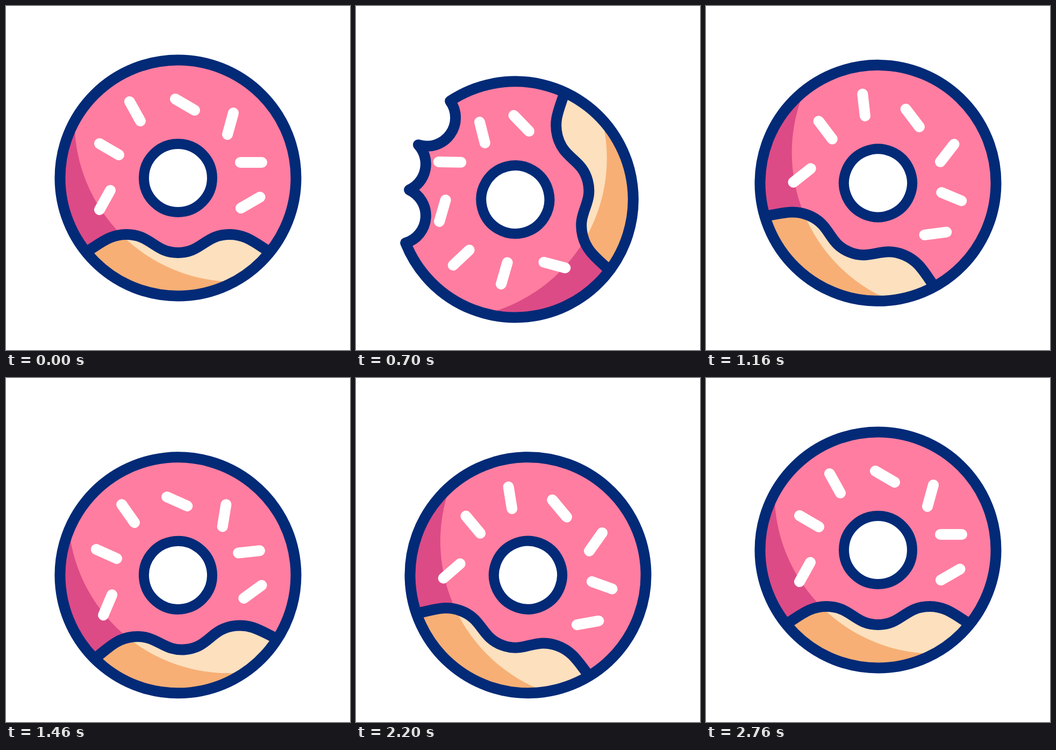
Write an HTML page that moves like this. It is 640 px wide and 640 px high and loops after 3000 ms.

```html
<!DOCTYPE html>
<html lang="en">
<head>
<meta charset="utf-8">
<title>Donut</title>
<style>
  html, body { margin: 0; width: 100%; height: 100%; overflow: hidden; background: #fff; }
  svg { display: block; width: 100%; height: 100%; }
  .line { fill: none; stroke: #022a77; stroke-width: 20; stroke-linejoin: round; }
  .round { fill: none; stroke-width: 20; stroke-linecap: round; }
</style>
</head>
<body>
<svg viewBox="0 0 640 640">
  <defs>
    <path id="body"/>
    <clipPath id="inside"><use href="#body"/></clipPath>
    <clipPath id="lit"><circle cx="105.5" cy="-105" r="298"/></clipPath>
    <path id="icing" d="M-165 134C-140 118-124 105-96 105C-50 105-44 139 0 139C44 139 50 105 96 105C124 105 140 118 165 134L240 180V-240H-240V180Z"/>
  </defs>
  <path id="rays" class="round" stroke="#ffcb4f"/>
  <g id="donut">
    <g clip-path="url(#inside)">
      <path fill="#f7af75" d="M-240-240H240V240H-240Z"/>
      <path fill="#fde0be" d="M-240-240H240V240H-240Z" clip-path="url(#lit)"/>
      <use href="#icing" fill="#dc4b86"/>
      <g clip-path="url(#lit)"><use href="#icing" fill="#ff7da0"/></g>
      <use href="#icing" class="line"/>
    </g>
    <path class="round" stroke="#fff" d="M-90-142L-70-106M-5-147L31-126M103-121L92-81M116-29H156M117 56L152.5 35.5M-146-64L-110-43M-126 23L-146 59"/>
    <circle r="63.5" class="line" style="fill:#fff;stroke-width:19"/>
    <use href="#body" class="line"/>
  </g>
</svg>
<script>
const LOOP = 3000, BITE = 360, HEAL = 1020;
const WHOLE = 'M219.5 0A219.5 219.5 0 1 1-219.5 0A219.5 219.5 0 1 1 219.5 0Z';
const BITTEN = 'M207.4-72.6A219.5 219.5 0 1 1-28.3-217.7A53 53 0 0 0 65.8-186.8A53 53 0 0 0 143-150A53 53 0 0 0 207.4-72.6Z';

// Keys are [time, value] pairs, eased between neighbours.
const xKeys = [[200, 320], [BITE, 325], [546, 277], [878, 320]];
const yKeys = [[200, 320], [BITE, 311], [546, 393], [878, 320], [1000, 320],
               [1620, 376], [1940, 330], [2300, 375], [2760, 320]];
const turnKeys = [[BITE, 0], [1330, -367], [1940, -360], [2300, -335.6], [2760, -360]];
const rayHead = [[BITE, 0], [510, 1]];
const rayTail = [[450, 0], [620, 1]];
// Inner end and outer end of each ray.
const rays = [[345.5, 96, 314, 23], [396, 102, 425.5, 27], [440, 133, 513.5, 102]];

const $ = id => document.getElementById(id);

function at(keys, t) {
  if (t <= keys[0][0]) return keys[0][1];
  for (let i = 1; i < keys.length; i++) {
    const [t0, a] = keys[i - 1], [t1, b] = keys[i];
    if (t < t1) {
      const p = (t - t0) / (t1 - t0);
      return a + (b - a) * p * p * (3 - 2 * p);
    }
  }
  return keys[keys.length - 1][1];
}

function draw(t) {
  $('donut').setAttribute('transform',
    `translate(${at(xKeys, t)} ${at(yKeys, t)}) rotate(${at(turnKeys, t)})`);
  $('body').setAttribute('d', t >= BITE && t < HEAL ? BITTEN : WHOLE);

  const head = at(rayHead, t), tail = at(rayTail, t);
  const point = ([x0, y0, x1, y1], p) => `${x0 + (x1 - x0) * p} ${y0 + (y1 - y0) * p}`;
  $('rays').setAttribute('d', head > tail
    ? rays.map(r => `M${point(r, tail)}L${point(r, head)}`).join('') : '');
}

function frame() {
  draw(performance.now() % LOOP);
  requestAnimationFrame(frame);
}
frame();
</script>
</body>
</html>
```
